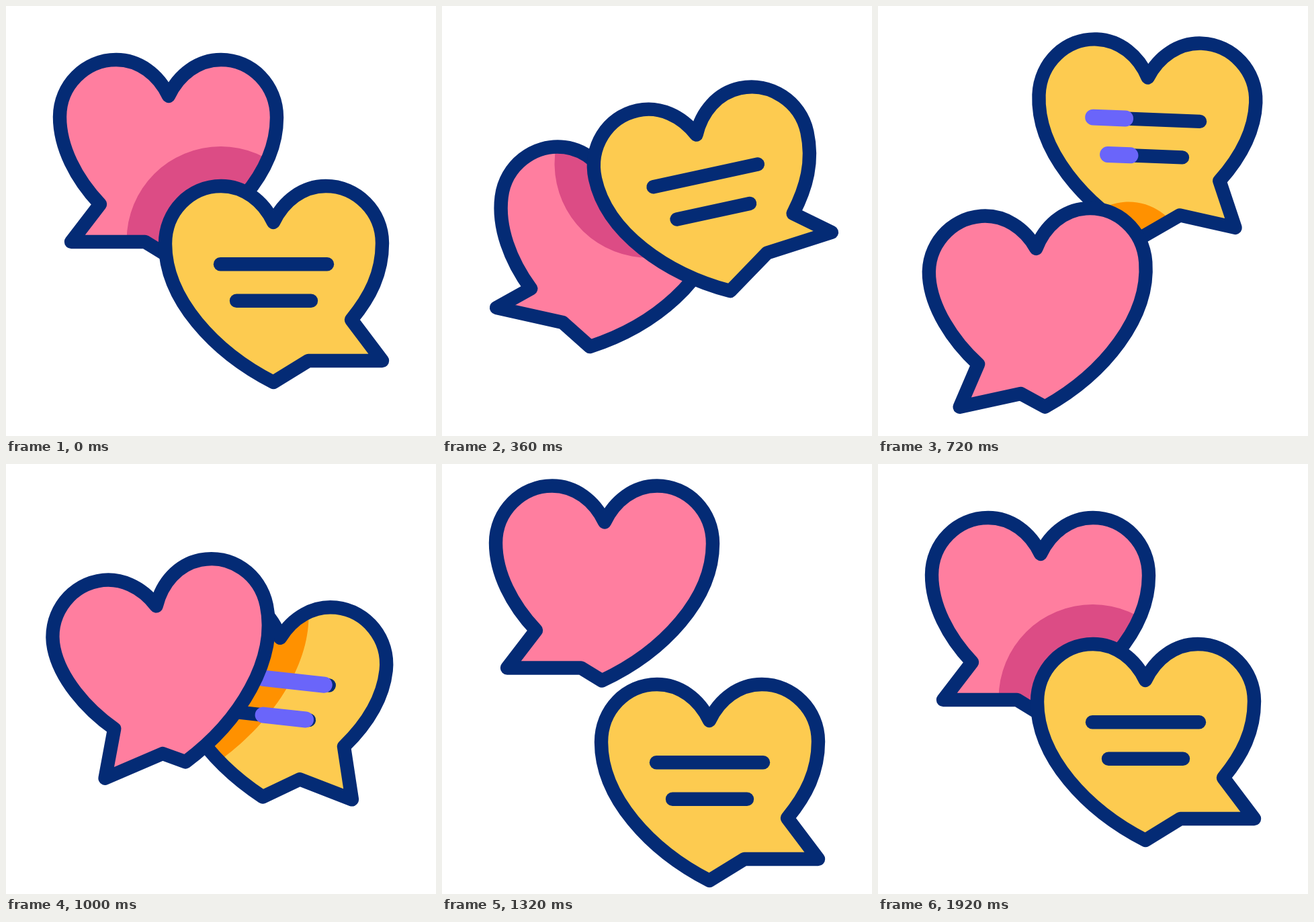
An HTML page with a canvas for the animation above (2 s loop, 640 by 640 pixels).

```html
<!DOCTYPE html>
<html lang="en">
<head>
<meta charset="utf-8">
<title>Heart chat</title>
<style>
  html, body { margin: 0; width: 100%; height: 100%; overflow: hidden; background: #fff; }
  canvas { display: block; width: 100vw; height: 100vh; }
</style>
</head>
<body>
<canvas id="stage" width="640" height="640"></canvas>
<script>
const ctx = document.getElementById('stage').getContext('2d');
const LOOP = 2000, NAVY = '#042b75', PURPLE = '#6a65fa';
const SWAPPED = 600, APART = 1320, REST = 1880;
const TILT_UP = 320, TILT_DOWN = 920;

// side: which way the tail points; other points are relative to the cleft
const yellow = {
  cleft: [398, 322], side: 1, pivot: [398.5, 414],
  fill: '#fdcb50', shade: '#ff9100',
  point: [0, 238], inner: [52, 206], tip: [162, 206], corner: [116, 145],
  bend: [28, -34], droop: [-33, 24],
  rise: [[0, 0], [SWAPPED, -238], [APART, 60], [REST, 0]],
  tilt: [[0, 0], [TILT_UP, -13], [SWAPPED, 0], [TILT_DOWN, 7], [APART, 0]],
};
const pink = {
  cleft: [242, 134], side: -1, pivot: [242, 225],
  fill: '#ff7e9f', shade: '#dc4c85',
  point: [4, 236], inner: [35, 217], tip: [145, 217], corner: [102, 161],
  bend: [36, -38], droop: [-21, 21],
  rise: [[0, 0], [SWAPPED, 249], [APART, -47.5], [REST, 0]],
  tilt: [[0, 0], [TILT_UP, 7.5], [SWAPPED, 0], [TILT_DOWN, -13], [APART, 0]],
};
const lift = [[0, 0], [TILT_UP, 1], [TILT_DOWN, 0]];
const sag = [[TILT_UP, 0], [TILT_DOWN, 1], [APART, 0]];

const clamp = p => Math.min(1, Math.max(0, p));
const smooth = p => p * p * (3 - 2 * p);

function tween(t, keys) {
  let value = keys[0][1];
  for (let i = 1; i < keys.length; i++) {
    const [t0, v0] = keys[i - 1], [t1, v1] = keys[i];
    if (t >= t0) value = v0 + (v1 - v0) * smooth(clamp((t - t0) / (t1 - t0)));
  }
  return value;
}

function heartPath(h, up, down) {
  const path = new Path2D();
  const at = (x, y) => [h.cleft[0] + h.side * x, h.cleft[1] + y];
  const line = (x, y) => path.lineTo(...at(x, y));
  const curve = (a, b, c, d, e, f) => path.bezierCurveTo(...at(a, b), ...at(c, d), ...at(e, f));
  const cx = h.corner[0] - 4.5 * down, cy = h.corner[1] + 6 * down;

  path.moveTo(...at(0, 0));
  curve(-15, -32, -44, -54, -78, -54);
  curve(-124, -54, -161, -16, -161, 32);
  curve(-161, 114, -88, 193, ...h.point);
  line(h.inner[0] + 14 * up, h.inner[1] - 12 * up);
  line(h.tip[0] + 4.5 * up + h.droop[0] * down, h.tip[1] - 22 * up + h.droop[1] * down);
  line(cx, cy);
  curve(cx + h.bend[0], cy + h.bend[1], 162, 76, 162, 31);
  curve(162, -16, 124, -54, 78, -54);
  curve(44, -54, 15, -32, 0, 0);
  path.closePath();
  return path;
}

function place(h, t) {
  // the first swap starts a little more slowly than the others
  const warped = t < SWAPPED ? SWAPPED * (t / SWAPPED) ** 1.22 : t;
  const [x, y] = h.pivot;
  ctx.translate(x, y + tween(warped, h.rise));
  ctx.rotate(tween(t, h.tilt) * Math.PI / 180);
  ctx.translate(-x, -y);
}

function strokeLine(x0, x1, y, width, color) {
  ctx.lineWidth = width;
  ctx.strokeStyle = color;
  ctx.beginPath();
  ctx.moveTo(x0, y);
  ctx.lineTo(x1, y);
  ctx.stroke();
}

function drawText(t) {
  const head = clamp((t - 592) / 428), tail = clamp((t - 838) / 428);
  for (const [x, y, length] of [[319, 384.3, 159], [343, 438.8, 111]]) {
    strokeLine(x, x + length, y, 20.4, NAVY);
    if (head > tail) strokeLine(x + length * tail, x + length * head, y, 24, PURPLE);
  }
}

function drawShade(under, over, overPath, t) {
  ctx.save();
  place(over, t);
  ctx.fillStyle = under.shade;
  if (over === yellow) {
    ctx.beginPath();
    ctx.arc(319.5, 349, 140, 0, 7);
    ctx.fill();
  } else {
    // a slightly larger copy, grown around the right lobe
    ctx.translate(320 + 58, 164 - 2);
    ctx.scale(1.04, 1.04);
    ctx.translate(-320, -164);
    ctx.fill(overPath);
  }
  ctx.restore();
}

function drawHeart(h, path, t, over, overPath) {
  ctx.save();
  place(h, t);
  ctx.fillStyle = h.fill;
  ctx.fill(path);
  ctx.restore();
  if (over) {
    ctx.save();
    place(h, t);
    ctx.clip(path);
    ctx.setTransform(1, 0, 0, 1, 0, 0);
    drawShade(h, over, overPath, t);
    ctx.restore();
  }
  ctx.save();
  place(h, t);
  if (h === yellow) drawText(t);
  ctx.lineWidth = 20.4;
  ctx.strokeStyle = NAVY;
  ctx.stroke(path);
  ctx.restore();
}

function draw(now) {
  const t = now % LOOP;
  const up = tween(t, lift), down = tween(t, sag);
  const pinkOnTop = t >= SWAPPED && t < APART + 20;
  const [under, over] = pinkOnTop ? [yellow, pink] : [pink, yellow];
  const underPath = heartPath(under, up, down), overPath = heartPath(over, up, down);

  ctx.fillStyle = '#fff';
  ctx.fillRect(0, 0, 640, 640);
  ctx.lineCap = ctx.lineJoin = 'round';
  drawHeart(under, underPath, t, over, overPath);
  drawHeart(over, overPath, t);
}

const start = performance.now();
function frame() {
  draw(performance.now() - start);
  requestAnimationFrame(frame);
}
frame();
</script>
</body>
</html>
```
